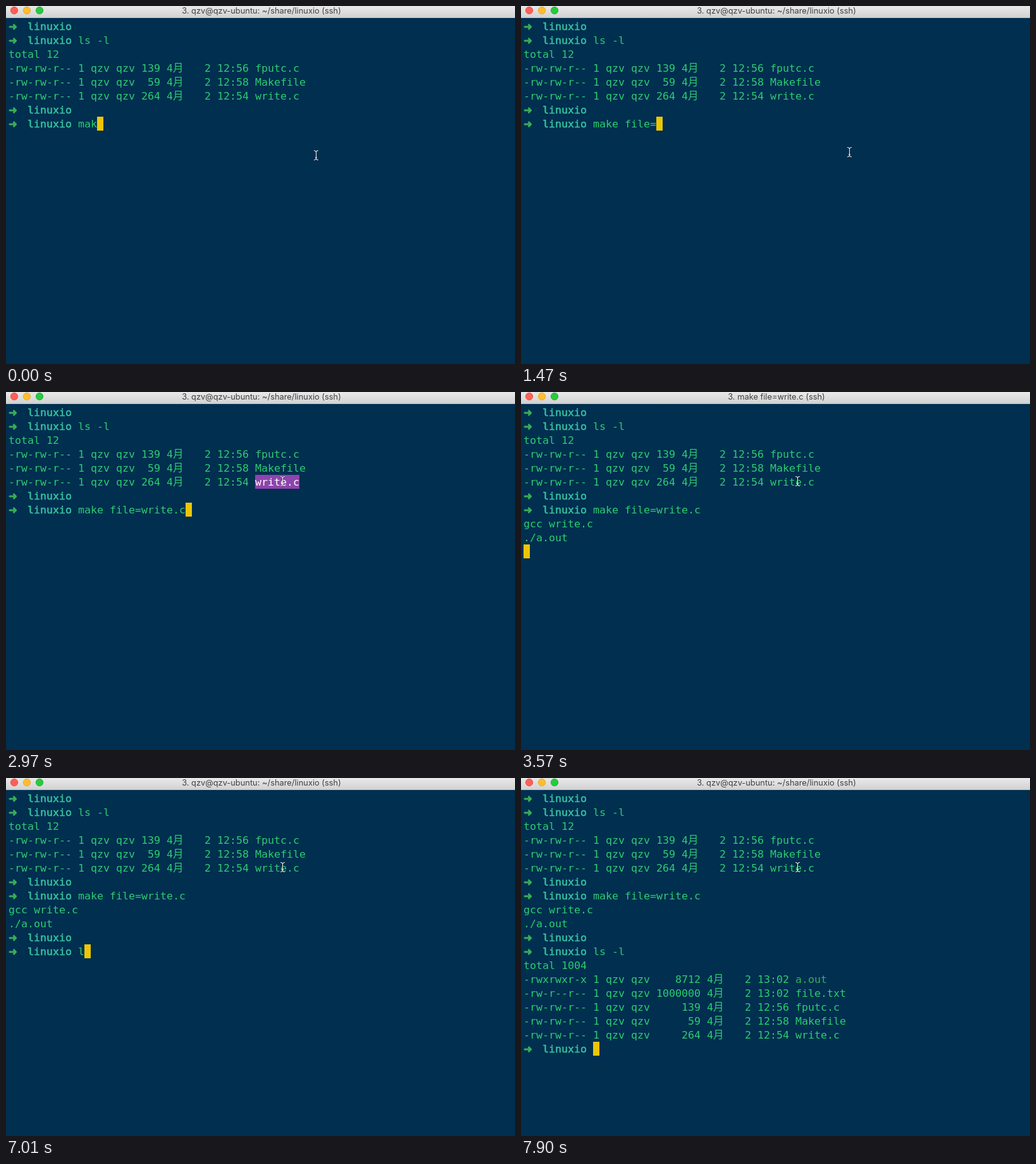
Write an HTML page with a canvas that moves like this. It is 805 px wide and 566 px high and loops after 8000 ms.

```html
<!DOCTYPE html>
<html lang="en">
<head>
<meta charset="utf-8">
<title>Terminal</title>
<style>
  html, body { margin: 0; width: 100%; height: 100%; overflow: hidden; background: #002f50; }
  canvas { display: block; }
</style>
</head>
<body>
<canvas id="stage" width="805" height="566"></canvas>
<script>
const ctx = document.getElementById('stage').getContext('2d');
const LOOP = 8000;
const LEFT = 4, TOP = 21, CELL = 10, ROW = 22, BASELINE = 17;
const MONO = '16.61px "DejaVu Sans Mono", "Noto Sans CJK SC", "Noto Sans CJK JP", monospace';
const ARROW = '16.61px "DejaVu Sans", sans-serif';
const color = {
  back: '#002f50', text: '#2ecc71', arrow: '#3aae58', folder: '#38c3a0',
  cursor: '#ecc606', selection: '#8e44ad', selected: '#ffffff',
};

const PROMPT = '➜  linuxio ';
const LISTING = [
  'total 12',
  '-rw-rw-r-- 1 qzv qzv 139 4月    2 12:56 fputc.c',
  '-rw-rw-r-- 1 qzv qzv  59 4月    2 12:58 Makefile',
  '-rw-rw-r-- 1 qzv qzv 264 4月    2 12:54 write.c',
];
const NEW_LISTING = [
  'total 1004',
  '-rwxrwxr-x 1 qzv qzv    8712 4月    2 13:02 a.out',
  '-rw-r--r-- 1 qzv qzv 1000000 4月    2 13:02 file.txt',
  '-rw-rw-r-- 1 qzv qzv     139 4月    2 12:56 fputc.c',
  '-rw-rw-r-- 1 qzv qzv      59 4月    2 12:58 Makefile',
  '-rw-rw-r-- 1 qzv qzv     264 4月    2 12:54 write.c',
];

// Each step is [start time, value].
const makeTyping = [
  [0, 'mak'], [140, 'make '], [590, 'make f'], [730, 'make fi'],
  [880, 'make file'], [1180, 'make file='], [2820, 'make file=write.c'],
];
const listTyping = [[0, ''], [7010, 'l'], [7160, 'ls'], [7300, 'ls -'], [7600, 'ls -l']];
const pointerPath = [
  [0, [490, 236]], [1470, [519, 231]], [1620, [566, 226]], [1770, [476, 169]],
  [1920, [453, 158]], [2070, [442, 155]], [2220, [437, 141]],
];

const at = (steps, t) => steps.filter(([start]) => t >= start).pop()[1];
const between = (t, start, end) => t >= start && t < end;

// The cursor sits at the end of the last line.
function screenLines(t) {
  const lines = [PROMPT, PROMPT + 'ls -l', ...LISTING, PROMPT, PROMPT + at(makeTyping, t)];
  if (t < 3420) return lines;
  lines.push('gcc write.c');
  if (t < 3570) return [...lines, ''];
  lines.push('./a.out');
  if (t < 5970) return [...lines, ''];
  lines.push(PROMPT);
  if (t < 6710) return lines;
  lines.push(PROMPT + at(listTyping, t));
  return t < 7900 ? lines : [...lines, ...NEW_LISTING, PROMPT];
}

// Prompt words are thickened with a thin stroke, lighter than a bold face.
function drawWord(word, col, row) {
  const isArrow = word === '➜', isFolder = word === 'linuxio';
  const x = LEFT + col * CELL, y = TOP + row * ROW + BASELINE;
  ctx.font = isArrow ? ARROW : MONO;
  ctx.fillStyle = isArrow || word === 'a.out' ? color.arrow : isFolder ? color.folder : color.text;
  ctx.fillText(word, x, y);
  if (isArrow || isFolder) {
    ctx.lineWidth = isArrow ? 0.9 : 0.5;
    ctx.strokeStyle = ctx.fillStyle;
    ctx.strokeText(word, x, y);
  }
}

function drawTerminal(t) {
  const lines = screenLines(t);
  lines.forEach((line, row) => {
    for (const match of line.matchAll(/\S+/g)) drawWord(match[0], match.index, row);
  });
  ctx.fillStyle = color.cursor;
  const last = lines.length - 1;
  ctx.fillRect(LEFT + lines[last].length * CELL, TOP + last * ROW, CELL, ROW);
}

function drawSelection(t) {
  if (!between(t, 2370, 3420)) return;
  const x = LEFT + 39 * CELL, y = TOP + 5 * ROW;
  ctx.fillStyle = color.selection;
  ctx.fillRect(x, y, 70, ROW);
  ctx.fillStyle = color.selected;
  ctx.font = MONO;
  ctx.fillText('write.c', x, y + BASELINE);
  if (between(t, 2670, 2970)) ctx.fillRect(x, y + 18, 70, 2);
}

function drawTitleBar(t) {
  const shade = ctx.createLinearGradient(0, 0, 0, 18);
  shade.addColorStop(0, '#e9e9e9');
  shade.addColorStop(1, '#d2d2d2');
  ctx.fillStyle = shade;
  ctx.fillRect(0, 0, 805, 18);
  ctx.fillStyle = '#c0c0c0';
  ctx.fillRect(0, 18, 805, 1);

  [['#ff5f57', '#e2463f'], ['#ffbd2e', '#e1a116'], ['#28c940', '#12ac28']].forEach(([fill, edge], i) => {
    ctx.beginPath();
    ctx.arc(13 + i * 20, 7, 5.7, 0, Math.PI * 2);
    ctx.fillStyle = fill;
    ctx.fill();
    ctx.strokeStyle = edge;
    ctx.lineWidth = 0.8;
    ctx.stroke();
  });

  ctx.font = '12.85px Inter, sans-serif';
  ctx.fillStyle = '#404040';
  ctx.textAlign = 'center';
  const running = between(t, 3570, 5970);
  ctx.fillText(running ? '3. make file=write.c (ssh)' : '3. qzv@qzv-ubuntu: ~/share/linuxio (ssh)', 404, 12);
  ctx.textAlign = 'left';
}

function outline(path, lineWidth, style) {
  ctx.lineWidth = lineWidth;
  ctx.strokeStyle = style;
  ctx.stroke(path);
}

const textPointer = new Path2D('M-3 -7.5Q0 -7.5 .5 -5Q1 -7.5 4 -7.5M.5 -5V5M-3 7.5Q0 7.5 .5 5Q1 7.5 4 7.5M-1 3.5H2');
const arrowPointer = new Path2D('M0 0V14L3.2 11L5.4 16L8 15L5.8 10H10.5Z');

function drawPointer(t) {
  ctx.save();
  ctx.translate(...at(pointerPath, t));
  if (between(t, 2670, 2820)) {
    outline(arrowPointer, 2, '#fff');
    ctx.fillStyle = '#000';
    ctx.fill(arrowPointer);
  } else {
    outline(textPointer, 2.2, '#0008');
    outline(textPointer, 1.1, '#f4f6f7');
  }
  ctx.restore();
}

function draw(now) {
  const t = now % LOOP;
  ctx.fillStyle = color.back;
  ctx.fillRect(0, 0, 805, 566);
  drawTitleBar(t);
  drawTerminal(t);
  drawSelection(t);
  drawPointer(t);
}

let start;
function tick(now) {
  start ??= now;
  draw(now - start);
  requestAnimationFrame(tick);
}
requestAnimationFrame(tick);
</script>
</body>
</html>
```
